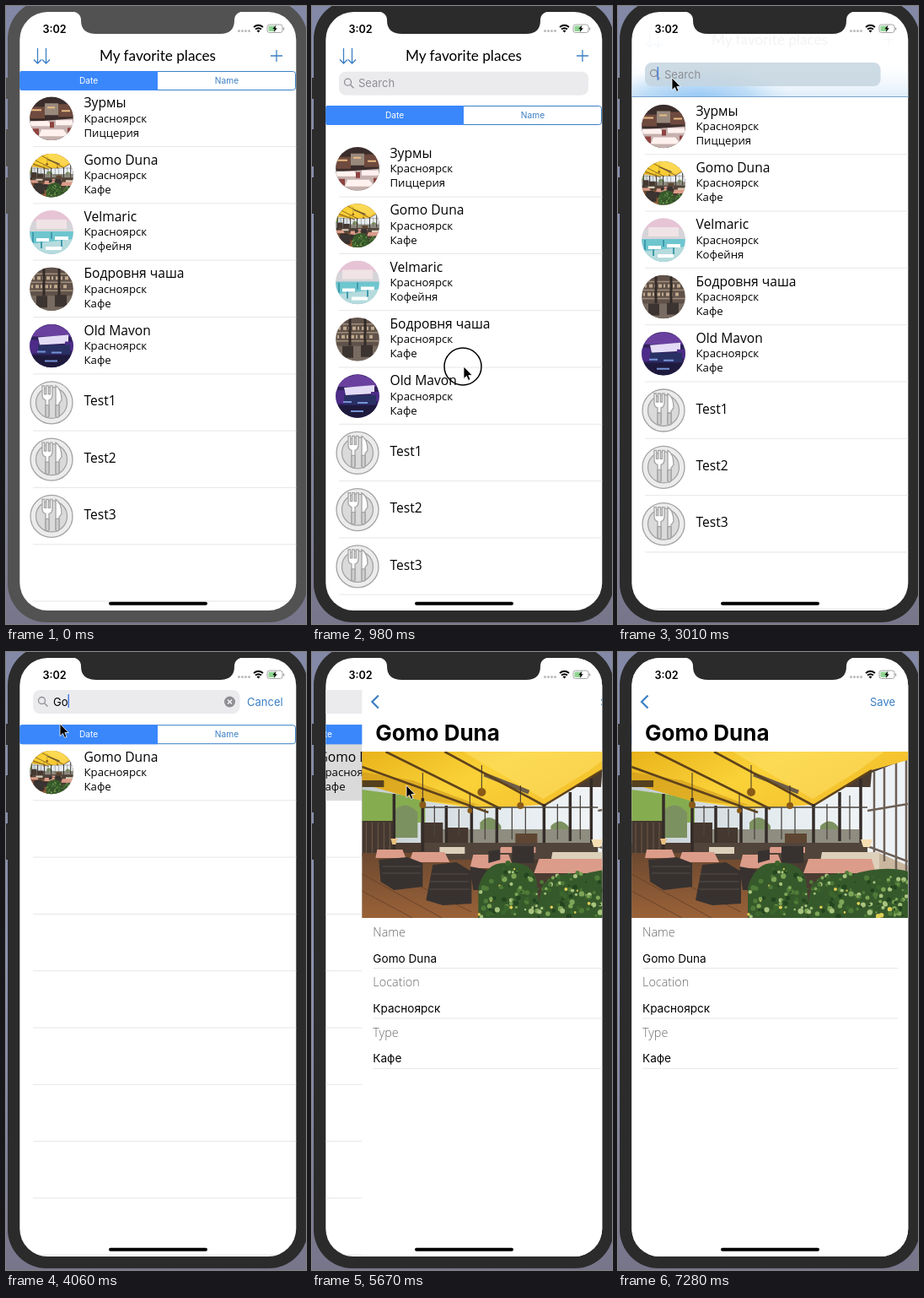
An HTML page for the animation above (7350 ms loop, 356x732 px).

```html
<!DOCTYPE html>
<html lang="en">
<head>
<meta charset="utf-8">
<title>Favorite places</title>
<style>
html, body { margin: 0; width: 100%; height: 100%; overflow: hidden; background: #858aa4; }
svg { display: block; width: 356px; height: 732px; }
text { white-space: pre; }
.ui { font-family: Inter, "Liberation Sans", sans-serif; }
.row, .label { font-family: "Open Sans", "Noto Sans", sans-serif; }
.row { fill: #000; }
.label { font-size: 14.4px; font-weight: 300; fill: #666; }
.title { font: 17.2px Lato, sans-serif; }
.blue { fill: #3b7fc4; }
.line { stroke: #e6e6e8; stroke-width: 1; }
.stroke { fill: none; stroke: #3b7fc4; }
</style>
</head>
<body>
<svg viewBox="0 0 356 732">
  <defs>
    <linearGradient id="wall" x2="0" y2="1">
      <stop stop-color="#8288a6"/><stop offset=".5" stop-color="#8f95b8"/><stop offset="1" stop-color="#77758a"/>
    </linearGradient>
    <linearGradient id="canopy" x2="1" y2=".4">
      <stop stop-color="#e9b31b"/><stop offset=".5" stop-color="#fad238"/><stop offset="1" stop-color="#f3bf2b"/>
    </linearGradient>
    <linearGradient id="floor" x2="0" y2="1">
      <stop stop-color="#6d4930"/><stop offset="1" stop-color="#9a6238"/>
    </linearGradient>
    <linearGradient id="glass" x2="1">
      <stop stop-color="#c3ccd0"/><stop offset=".5" stop-color="#e4ebef"/><stop offset="1" stop-color="#f5f7f9"/>
    </linearGradient>
    <radialGradient id="haze" gradientUnits="userSpaceOnUse" cx="0" cy="0" r="1" gradientTransform="translate(95 112) scale(110 42)">
      <stop stop-color="#6db2f2" stop-opacity=".7"/><stop offset=".6" stop-color="#8fc4f2" stop-opacity=".45"/><stop offset="1" stop-color="#b8dcf6" stop-opacity="0"/>
    </radialGradient>
    <linearGradient id="veil" x2="0" y2="1">
      <stop stop-color="#fff" stop-opacity="0"/><stop offset="1" stop-color="#cfe5f7" stop-opacity=".7"/>
    </linearGradient>
    <clipPath id="screen"><rect x="16.300" y="7" width="328" height="709" rx="33"/></clipPath>
    <clipPath id="disc"><circle r="25.800"/></clipPath>
    <clipPath id="frame"><rect width="328" height="197"/></clipPath>
    <g id="terrace" clip-path="url(#frame)">
      <rect width="328" height="197" fill="#4b3c32"/>
      <path d="M0 42H328V108H0Z" fill="url(#glass)"/>
      <path d="M0 45L75 55V84H0Z" fill="#86ac50"/>
      <path d="M38 70Q52 56 66 72V102H38ZM140 84Q152 70 165 88V104H140ZM224 88Q236 76 246 90V104H224Z" fill="#7c9160"/>
      <path d="M75 92H270V108H75Z" fill="#8f8d80"/>
      <path d="M0 82H38V124H0ZM70 84H96V118H70ZM100 90H126V118H100Z" fill="#453830"/>
      <path d="M5 84V122M12 84V122M19 84V122M26 84V122M33 84V122" stroke="#705b48"/>
      <path d="M0 120H160V197H0Z" fill="url(#floor)"/>
      <path d="M0 145L95 197M0 165L60 197M20 135L130 190" stroke="#6a432b" fill="none"/>
      <path d="M285 25L328 8V165L276 130Z" fill="#edf2f6"/>
      <path d="M294 120L328 135V165L280 140Z" fill="#c9b79f"/>
      <path d="M288 24V122M300 18V130M314 12V140M326 8V150M280 70L328 62M280 112L328 130" stroke="#6d5f55" stroke-width="2.500"/>
      <path d="M0 0H328V10L285 22 215 63 140 68 70 58 0 38Z" fill="url(#canopy)"/>
      <path d="M120 0L300 0 270 22 215 56Z" fill="#ffe370" opacity=".5"/>
      <path d="M0 24L60 34 140 64 70 58 0 38Z" fill="#c78f16" opacity=".5"/>
      <path d="M145 27L198 48" stroke="#6b5c48" stroke-width="5"/>
      <path d="M98 0L218 65M28 0L165 68M0 18L150 72M285 22L214 65" stroke="#5f431b" stroke-width="2.600" fill="none"/>
      <path d="M0 34H26V42H0Z" fill="#54401f"/>
      <path d="M38 50V118M72 55V118M100 64V112M130 66V110M160 66V108M216 62V122M247 48V106M272 32V122" stroke="#342c28" stroke-width="3.500"/>
      <path d="M72 66H280M86 64V100M115 68V100M146 68V104M178 66V104M194 66V104M232 62V104M259 52V104" stroke="#4b4540" stroke-width="1.300"/>
      <path d="M72 25V60M142 16V46M188 40V60M128 50V70" stroke="#3b3029"/>
      <g fill="#8a5b17"><circle cx="72" cy="63" r="4"/><circle cx="142" cy="48" r="5"/><circle cx="188" cy="64" r="4"/><circle cx="128" cy="70" r="3"/></g>
      <path d="M182 97H208V114H182Z" fill="#5e4632"/>
      <path d="M74 108H280V128H74Z" fill="#51443a"/>
      <path d="M226 119H294V142H222ZM92 113H122V121H92Z" fill="#ddd0ba"/>
      <path d="M18 116H48L52 126H16ZM60 119H98L104 131H56ZM132 122H174L180 138H128ZM165 113H206V120H162ZM210 127H285L290 144H204Z" fill="#dc9c8a"/>
      <path d="M20 128L54 125 72 132V160L38 164 22 154ZM84 134L112 131 130 142V180L96 182 76 176ZM128 136L150 140V164H132ZM150 118L164 116V128L150 132ZM178 112H204V132H178Z" fill="#373230"/>
      <path d="M24 136H70M24 144H70M82 145H126M80 154H127M80 163H128" stroke="#554c46"/>
      <path d="M272 104H286L283 113H275Z" fill="#f6dfb4"/>
      <path d="M34 103H42L40 110H36Z" fill="#e8c07f"/>
      <path d="M138 197V160Q148 130 170 132Q200 128 207 152L212 197ZM206 197L214 158Q232 140 260 146Q300 134 328 142V197Z" fill="#36592b"/>
      <g id="leaves"></g>
    </g>
    <g id="pic0">
      <path d="M-26-26H26V26H-26Z" fill="#3a2d2b"/>
      <path d="M-26-14H-8V0H-26ZM8-17H26V-2H8Z" fill="#6f4a3e"/>
      <path d="M-8-18H8V-4H-8Z" fill="#99897d"/>
      <path d="M-24-10H-12M-5-13H4M12-9H22" stroke="#e8ba83" stroke-width="2"/>
      <path d="M-26 4L26 0V26H-26Z" fill="#c5b1ae"/>
      <path d="M-25 3H-4L1 9H-26ZM5 2H25V8H5ZM-12 13H14L20 21H-15Z" fill="#fff1ee"/>
      <path d="M-22 12H-15V20H-22ZM19 11H24V18H19ZM-2 4H3V11H-2Z" fill="#8f4340"/>
    </g>
    <g id="pic1"><use href="#terrace" transform="translate(-43 -26) scale(.266)"/></g>
    <g id="pic2">
      <path d="M-26-26H26V26H-26Z" fill="#e6c4d5"/>
      <path d="M-26-13H26V0H-26Z" fill="#d5d4d8"/>
      <path d="M-18-15H18V-4H-18Z" fill="#f0e3e5"/>
      <path d="M-26-1H26V26H-26Z" fill="#6ec6cf"/>
      <path d="M-26 14L26 8V26H-26Z" fill="#b6dbdd"/>
      <path d="M-18 7H-3V11H-18ZM4 5H20V9H4ZM-7 17H12V21H-7Z" fill="#fff"/>
      <path d="M-12 11V19M12 9V17M-22 0V12M0 0V8" stroke="#3f9bab" stroke-width="2"/>
    </g>
    <g id="pic3">
      <path d="M-26-26H26V26H-26Z" fill="#60524a"/>
      <path d="M-26-18H26M-26-8H26M-26 2H26" stroke="#a08d78" stroke-width="1.500"/>
      <path d="M-22-13H22M-24-3H20" stroke="#c0a98d" stroke-width="4" stroke-dasharray="2 3 4 2"/>
      <path d="M-9-26V8M9-26V8" stroke="#332b28" stroke-width="3"/>
      <path d="M-26 8H26V26H-26Z" fill="#786b61"/>
      <path d="M-18 8H-5V22H-18ZM4 7H18V21H4Z" fill="#3c3430"/>
    </g>
    <g id="pic4">
      <path d="M-26-26H26V26H-26Z" fill="#30205c"/>
      <path d="M-26-18L0-26 26-18V-11H-26Z" fill="#6a419f"/>
      <path d="M-16-10L20-13V-3L-14-1Z" fill="#e4dcf6"/>
      <path d="M-26-7H-15V9H-26ZM16-5H26V6H16Z" fill="#4c2c88"/>
      <path d="M-16-1H22V10H-16Z" fill="#293164"/>
      <path d="M-26 11H26V26H-26Z" fill="#1e1a3d"/>
      <path d="M-17 7H-7M0 8H12M-8 18H7" stroke="#7692d5" stroke-width="2"/>
    </g>
    <g id="plate" stroke="#a3a3a3" stroke-width="1.300">
      <circle r="25" fill="#ececec"/><circle r="18.500" fill="#dadada"/>
      <path d="M-11-20V-9Q-11-4-7-3V16Q-5 19-3 16V-3Q1-4 1-9V-20H-1.500V-10H-3.700V-20H-6.300V-10H-8.500V-20Z" fill="#fff"/>
      <path d="M5-20Q12-16 12-3L9 1V16Q7 19 5 16Z" fill="#fff"/>
      <path d="M-7 3H-3V16Q-5 19-7 16ZM5 3H9V16Q7 19 5 16Z" fill="#cfcfcf"/>
    </g>
  </defs>

  <rect width="356" height="732" fill="url(#wall)"/>
  <g id="case" fill="currentColor">
    <path d="M0 85H3V110H0ZM0 146H3V190H0ZM0 203H3V246H0Z"/>
    <rect x="2" y="-7" width="356" height="737" rx="46"/>
  </g>

  <g clip-path="url(#screen)">
    <rect x="16" y="7" width="329" height="709" fill="#fff"/>
    <g id="browse">
      <g id="list"></g>
      <g id="head">
        <path class="stroke" stroke-width="1.300" d="M37.500 50V68M33 63.500L37.500 68 42 63.500M47.500 50V68M43 63.500L47.500 68 52 63.500M314 59H328M321 52V66"/>
        <text class="title" x="180" y="65" text-anchor="middle">My favorite places</text>
      </g>
      <g id="seg" class="ui" font-size="10.200" text-anchor="middle">
        <rect x="16.500" y=".5" width="327" height="22" rx="3" fill="#fff" stroke="#3b7fc4"/>
        <path d="M180 0H19Q16 0 16 3V20Q16 23 19 23H180Z" fill="#3a87fb"/>
        <text x="98" y="15" fill="#fff">Date</text>
        <text x="262" y="15" class="blue">Name</text>
      </g>
      <g id="glow">
        <rect x="16" y="62" width="329" height="46" fill="url(#veil)"/>
        <rect x="16" y="62" width="329" height="46" fill="url(#haze)"/>
        <path d="M16 107.500H345" stroke="#7aa5cd"/>
      </g>
      <g id="field" class="ui" font-size="13">
        <rect id="box" x="32" rx="8"/>
        <g id="inner">
          <g fill="none" stroke="#8e8e93" stroke-width="1.300"><circle cx="42.500" cy="12.500" r="4"/><path d="M45.500 15.500L49.500 19.500"/></g>
          <text id="hint" x="55" y="18.500" fill="#8e8e93">Search</text>
          <text id="query" x="56" y="18.500"></text>
          <rect id="caret" y="5" width="1.500" height="16" fill="#4b7fe0"/>
          <g id="clear"><circle cx="265.500" cy="14" r="6.500" fill="#8e8e93"/><path d="M263 11.500L268 16.500M268 11.500L263 16.500" stroke="#fff" stroke-width="1.200"/></g>
        </g>
      </g>
      <text id="cancel" class="ui blue" y="63.500" font-size="13">Cancel</text>
    </g>
    <g id="detail">
      <rect x="16" y="7" width="329" height="709" fill="#fff"/>
      <path class="stroke" stroke-width="2.200" d="M35.500 51.500L28 59 35.500 66.500"/>
      <text class="ui blue" x="299" y="64" font-size="13">Save</text>
      <text class="ui" x="32" y="105" font-size="26" font-weight="700" id="big"></text>
      <use href="#terrace" x="16" y="118"/>
      <g id="form"></g>
    </g>
    <text class="ui" x="43.500" y="31.500" font-size="12.600" font-weight="600">3:02</text>
    <g fill="#bcbcbc"><circle cx="276.500" cy="29.500" r="1.500"/><circle cx="280.500" cy="29.500" r="1.500"/><circle cx="284.500" cy="29.500" r="1.500"/><circle cx="288.500" cy="29.500" r="1.500"/></g>
    <path d="M294 25Q299.500 20.500 305 25M296 27.500Q299.500 24.800 303 27.500" fill="none" stroke="#000" stroke-width="1.900"/>
    <path d="M297.500 29.300Q299.500 27.800 301.500 29.300L299.500 31.500Z"/>
    <rect x="310" y="22" width="18" height="9.500" rx="2.500" fill="#fff" stroke="#a5a5a5"/>
    <rect x="311.500" y="23.500" width="8" height="6.500" rx="1" fill="#8fd492"/>
    <path d="M329.500 25.500V28.500" stroke="#a5a5a5" stroke-width="1.500"/>
    <path d="M320.500 22.500L316.300 27.300H318.600L317.800 31 321.800 26.200H319.500Z"/>
    <rect x="122" y="705.700" width="117" height="4" rx="2"/>
  </g>
  <path id="notch" fill="currentColor" d="M76 6Q89 7 89 17Q89 33 107 33H254Q271 33 271 17Q271 7 284 6Z"/>
  <circle id="touch" r="22" fill="none" stroke="#000" stroke-width="1.500"/>
  <path id="cursor" d="M0 0V14.500L3.400 11.400 5.600 16.400 8 15.400 5.800 10.500H10.200Z" stroke="#fff" stroke-width=".8"/>
</svg>
<script>
const LOOP = 7350, ROW = 67.3, TOP = 99.3;
const CITY = "Красноярск", PICK = "Gomo Duna";
const places = [["Зурмы", "Пиццерия"], [PICK, "Кафе"], ["Velmaric", "Кофейня"],
  ["Бодровня чаша", "Кафе"], ["Old Mavon", "Кафе"], ["Test1"], ["Test2"], ["Test3"]];
const el = {};
document.querySelectorAll("[id]").forEach(n => el[n.id] = n);

const label = (y, size, s) => `<text class="row" x="92.5" y="${y}" font-size="${size}">${s}</text>`;

function row(i, slot) {
  const [name, type] = places[i];
  const body = type
    ? `<g transform="translate(54 34)" clip-path="url(#disc)"><use href="#pic${i}"/></g>` +
      label(21.2, 15.6, name) + label(38.6, 13.2, CITY) + label(55.6, 13.2, type)
    : `<use href="#plate" x="54" y="34"/>` + label(37.7, 15.6, name);
  return `<g transform="translate(0 ${slot * ROW})">${body}</g>`;
}

const rules = Array.from({ length: 9 }, (_, i) =>
  `<path class="line" d="M32 ${(i + 1) * ROW}H345"/>`).join("");
el.list.innerHTML = rules +
  `<g id="all">${places.map((_, i) => row(i, i)).join("")}</g>` +
  `<g id="hit"><rect id="mark" x="16" width="329" height="${ROW}" fill="#dadada"/>${row(1, 0)}</g>`;
["all", "hit", "mark"].forEach(id => el[id] = document.getElementById(id));

el.big.textContent = PICK;
el.form.innerHTML = [["Name", PICK], ["Location", CITY], ["Type", "Кафе"]].map(([k, v], i) =>
  `<g transform="translate(0 ${i * 59.4})"><text class="label" x="29" y="337">${k}</text>
   <text class="ui" x="29" y="367.5" font-size="13.6">${v}</text>
   <path class="line" d="M29 374.500H332"/></g>`).join("");

// Scattered foliage from a seeded generator
let seed = 7;
const rnd = () => (seed = seed * 16807 % 2147483647) / 2147483647;
const tones = ["#24451f", "#4f7b38", "#7da556", "#a8c47f", "#3b652c", "#e0cf55"];
el.leaves.innerHTML = Array.from({ length: 230 }, (_, i) => {
  const left = i % 3 === 0;
  const u = rnd(), arch = (2 * u - 1) ** 2;
  const x = left ? 139 + u * 70 : 208 + u * 120;
  const top = left ? 132 + 24 * arch : 142 + 10 * arch;
  const y = mix(top, 196, rnd());
  return `<circle cx="${x.toFixed(1)}" cy="${y.toFixed(1)}" r="${(1 + rnd() * 2.3).toFixed(1)}" fill="${tones[i % 19 ? i % 5 : 5]}"/>`;
}).join("");

function mix(a, b, p) { return a + (b - a) * p; }
const clamp = v => Math.max(0, Math.min(1, v));
const smooth = v => v * v * (3 - 2 * v);
const span = (t, a, b) => smooth(clamp((t - a) / (b - a)));

// Eased value from [time, value] steps
function track(keys, t) {
  let v = keys[0][1];
  for (let i = 1; i < keys.length; i++) v = mix(v, keys[i][1], span(t, keys[i - 1][0], keys[i][0]));
  return v;
}

const pullKeys = [[350, 0], [950, 59.5], [1060, 59.5], [1500, 41.5], [2800, 41.5], [2950, 9.2]];
const curX = [[300, 178], [950, 180], [1100, 180], [1550, 175], [2100, 175], [2750, 64], [4480, 64], [5150, 112]];
const curY = [[350, 347], [950, 427], [1100, 427], [1550, 430.5], [2100, 430.5], [2750, 85], [4480, 85], [5150, 158]];
const strokes = [3850, 4060, 4270];
const presses = [[330, 1090], [2730, 2860], [5240, 5340]];

const set = (n, o) => { for (const k in o) n.setAttribute(k, o[k]); };
const show = (n, on) => set(n, { opacity: +on });
const move = (n, x, y) => set(n, { transform: `translate(${x} ${y})` });

function draw(t) {
  const color = t < 70 ? "#525252" : "#2b2b2b";
  el.case.style.color = el.notch.style.color = color;

  const pull = track(pullKeys, t);
  const focus = span(t, 2870, 3240);
  const searching = t >= 2800;
  move(el.list, 0, TOP + pull);
  move(el.seg, 0, 77 + Math.min(pull, 41));
  show(el.seg, 1 - span(t, 2840, 2930) + span(t, 3120, 3290));
  const gone = span(t, 2820, 3040);
  move(el.head, 0, -20 * gone);
  show(el.head, 1 - gone);

  const tall = searching ? 28 : 28 * clamp((pull - 13) / 28);
  const glow = span(t, 2850, 2960) * (1 - span(t, 3090, 3290));
  move(el.field, 0, mix(77.7, 45, focus));
  set(el.box, {
    width: mix(296, 245.5, focus), height: tall,
    fill: `rgb(${235 - 38 * glow},${235 - 22 * glow},${238 - 14 * glow})`,
    "fill-opacity": 1 - 0.15 * glow
  });
  move(el.inner, 0, (tall - 28) / 2);
  show(el.inner, clamp((tall - 14) / 14));
  show(el.glow, glow);
  set(el.cancel, { x: mix(346, 286, focus), opacity: span(t, 3030, 3240) });

  const typed = PICK.slice(0, strokes.filter(s => t >= s).length);
  if (el.query.textContent !== typed) el.query.textContent = typed;
  show(el.hint, !typed);
  show(el.clear, !!typed);
  const end = typed ? el.query.getComputedTextLength() + 56 : mix(42.5, 55, focus);
  const blink = t < 4270 || (t - 4270) % 1000 < 600;
  set(el.caret, { x: end, opacity: +(t >= 2900 && blink) });
  show(el.all, !typed);
  show(el.hit, !!typed);
  show(el.mark, t >= 5320);

  const push = 1 - (1 - clamp((t - 5450) / 450)) ** 3;
  move(el.browse, -98 * push, 0);
  move(el.detail, 329 * (1 - push), 0);

  const x = track(curX, t), y = track(curY, t);
  move(el.cursor, x, y);
  move(el.touch, x - 1, y);
  show(el.cursor, t >= 300 && t < 6650);
  show(el.touch, presses.some(([a, b]) => t >= a && t < b));
}

const start = performance.now();
function tick() {
  draw((performance.now() - start) % LOOP);
  requestAnimationFrame(tick);
}
tick();
</script>
</body>
</html>
```
